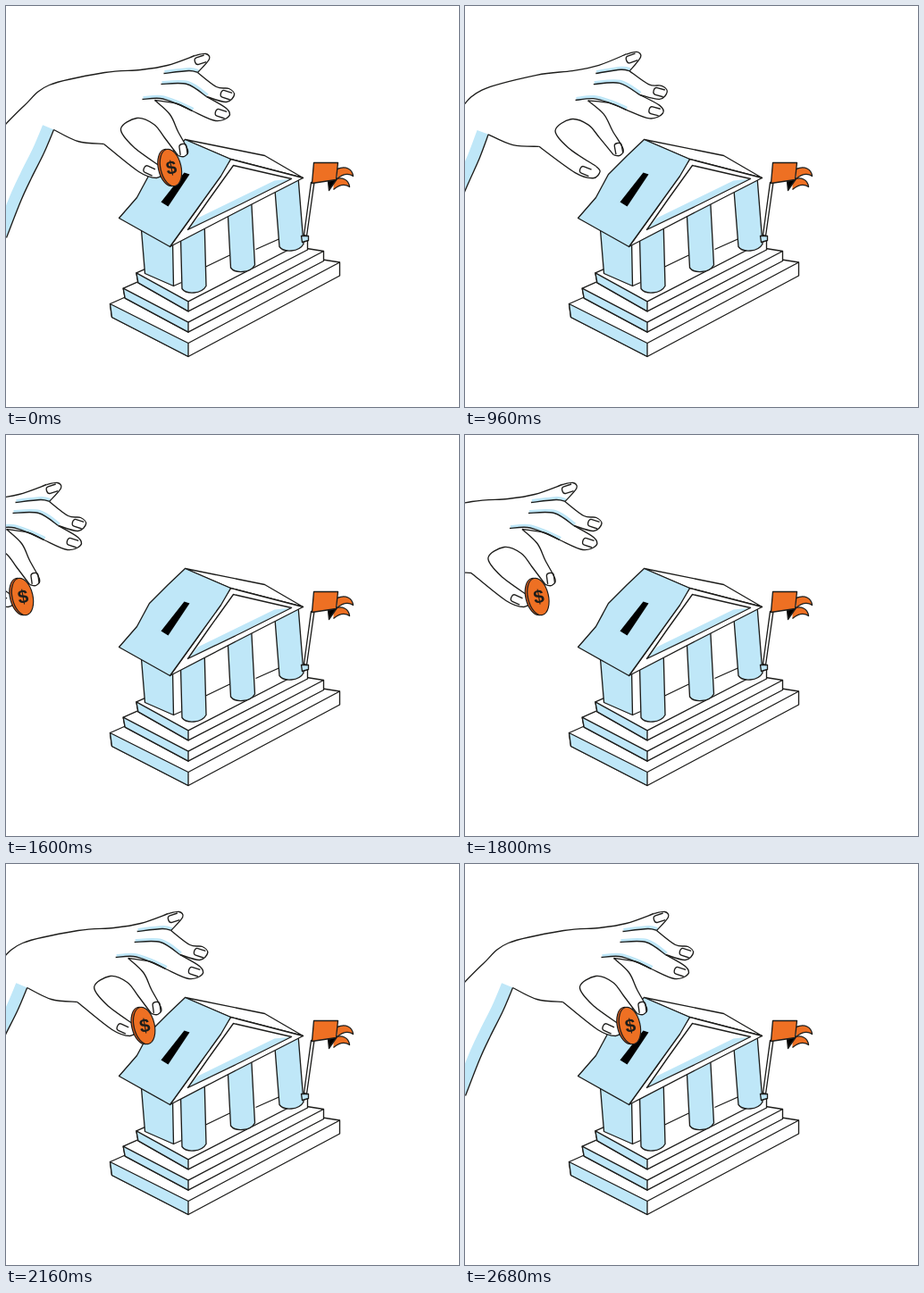
Recreate the animation shown at these times as an HTML page. Size 507 by 449 pixels, loop 2920 ms.

```html
<!DOCTYPE html>
<html lang="en">
<head>
<meta charset="utf-8">
<title>Saving at the bank</title>
<style>
  html, body { margin: 0; width: 100%; height: 100%; overflow: hidden; background: #fff; }
  svg { display: block; width: 507px; height: 449px; }
  path { stroke-linejoin: round; }
  text { font: bold 21px "Liberation Sans", Arial, sans-serif; text-anchor: middle; fill: #1d1d1b; }
</style>
</head>
<body>
<svg viewBox="0 0 507 449">
  <defs>
    <clipPath id="aboveSlot"><path d="M-300 0H335.500L127 300H-300Z"/></clipPath>
  </defs>
  <g transform="translate(.5 .5)">
    <g id="bank"></g>
    <g id="hand"></g>
    <g clip-path="url(#aboveSlot)"><g id="coin"></g></g>
  </g>
</svg>
<script>
const INK = '#1d1d1b', BLUE = '#bfe7f8', ORANGE = '#ee7023', RUST = '#d65a1c', WHITE = '#fff';
const LOOP = 2920, STEP = 40;
const [bank, hand, coin] = ['bank', 'hand', 'coin'].map(id => document.getElementById(id));

function add(parent, tag, attributes) {
  const node = document.createElementNS('http://www.w3.org/2000/svg', tag);
  for (const name in attributes) node.setAttribute(name, attributes[name]);
  parent.append(node);
  return node;
}

function draw(parent, d, fill = 'none', stroke = INK, transform = '', width = 1.35) {
  add(parent, 'path', { d, fill, stroke, transform, 'stroke-width': width });
}

// Smooth path through a list of "x,y" points
function curve(text) {
  const p = text.split(' ').map(s => s.split(',').map(Number));
  let d = `M${p[0]}`;
  for (let i = 0; i < p.length - 1; i++) {
    const a = p[i - 1] || p[i], b = p[i], c = p[i + 1], e = p[i + 2] || c;
    const out = b.map((v, k) => v + (c[k] - a[k]) / 6);
    const into = c.map((v, k) => v - (e[k] - b[k]) / 6);
    d += `C${out} ${into} ${c}`;
  }
  return d;
}

// Each step is a slab seen from its front corner
function drawStep(i) {
  const height = i ? 11 : 15;
  const [lx, ly] = [116 + 14.7 * i, 333 - 17.3 * i];
  const [fx, fy] = [203.5, 377 - 23.3 * i];
  const [rx, ry] = [373 - 18 * i, 286.5 - 12.5 * i];
  const side = `M${fx} ${fy + height}L${lx + 2} ${ly + height}L${lx} ${ly}`;
  draw(bank, `${side}L${lx + 18} ${ly - 8}L${rx - 19} ${ry - 3}L${rx} ${ry}V${ry + height}Z`, WHITE);
  draw(bank, `${side}L${fx} ${fy}Z`, BLUE);
  draw(bank, `M${fx} ${fy}L${rx} ${ry}`);
}

function drawColumn(i) {
  const x = 196.5 + 54.5 * i, y = 316 - 23.5 * i, lean = 2 + 2 * i;
  draw(bank, `M${x - lean} ${y - 76}L${x} ${y}c5 7 22 6 27 -3L${x + 27 - lean} ${y - 78}Z`, BLUE);
}

function drawBank() {
  for (let i = 0; i < 3; i++) drawStep(i);
  draw(bank, 'M151 250L190 262L324 198L330 262L223 315L187 313Z', WHITE, 'none');
  draw(bank, 'M222 292L251 278M279 272L306 260');
  draw(bank, 'M151 250L155 299L187 313L186 262Z', BLUE);
  draw(bank, 'M187 313L196 309');
  for (let i = 0; i < 3; i++) drawColumn(i);

  draw(bank, 'M200 149L289 167L332 192L251 171Z', WHITE);
  draw(bank, 'M251 171L332 192L258 230L183 269L214 226Z', WHITE);
  draw(bank, 'M203 250L214 237L300 195L318 193Z', BLUE, 'none');
  draw(bank, 'M254 178L319 193L263 221L203 250L226 217Z');
  draw(bank, 'M200 149L251 171L240 190L214 226L183 269L126 237L146 214L160 188L181 167Z', BLUE);
  draw(bank, 'M199 186L205 188L181 224L173 219Z', '#000', 'none');
}

function drawFlag() {
  draw(bank, 'M330 257H338V262L331 264Z', BLUE);
  draw(bank, 'M333 256L341 197H344.500L336 257Z', WHITE);
  const tail = 'M370 182C380 178 387 182 388 190C382 186 376 188 370 193';
  draw(bank, tail, ORANGE);
  draw(bank, tail, ORANGE, INK, 'translate(-4 12)');
  draw(bank, 'M360 196L370 193L361 206Z', '#000');
  draw(bank, 'M344 175L371 175L369 194L342 198Z', ORANGE);
}

// Soft shadow: a broad stroke beside a line
const shade = (d, dx, dy, width) => draw(hand, d, 'none', BLUE, `translate(${dx} ${dy})`, width);

const nail = (x, y, angle) =>
  draw(hand, 'M12 -4H3Q0 -4 0 0Q0 4 3 4H12', 'none', INK, `translate(${x} ${y}) rotate(${angle})`);

function drawHand() {
  const arm = curve('53,138 42,164 28,192 16,218 0,259');
  const outline = [
    curve('-3,134 20,111 48,88 110,74 150,71 180,66 211,55'),
    curve('211,55 223,53 227,59 214,74'),
    curve('214,74 235,90 249,92 255,99 246,107 224,101'),
    curve('224,101 246,114 249,123 234,128 208,117 191,109 166,105'),
    curve('166,105 183,121 192,140 203,161 199,168 192,167'),
    curve('192,167 177,147 165,132 146,125 128,137 142,157 172,179'),
    curve('172,179 176,185 168,192 148,185 109,154'),
    curve('109,154 80,151 53,138'),
    arm
  ];
  const creases = [
    curve('176,75 204,72 214,74'),
    curve('173,87 202,87 224,101'),
    curve('152,104 172,103 191,109 208,117')
  ];
  draw(hand, outline.map((d, i) => i ? 'L' + d.slice(1) : d).join('') + 'Z', WHITE, 'none');
  shade(arm, -6.4, -2.8, 13);
  for (const d of creases) shade(d, 1, -1.5, 4);
  for (const d of [...outline, ...creases]) draw(hand, d);

  nail(211, 62, -18);
  nail(240, 97, 18);
  nail(234, 118, 18);
  nail(197, 154, 82);
  nail(154, 181, 25);
}

function drawCoin() {
  const disc = (x, fill) => add(coin, 'ellipse', {
    cx: x, cy: 180.5, rx: 11.5, ry: 21, fill, stroke: INK, 'stroke-width': 1.2,
    transform: `rotate(-13 ${x} 180.5)`
  });
  disc(181.5, RUST);
  disc(184, ORANGE);
  add(coin, 'text', { x: 184.5, y: 187.5, transform: 'rotate(-10 184.5 180)' }).textContent = '$';
}

const progress = (t, start, end) => Math.min(1, Math.max(0, (t - start) / (end - start)));

function render(t) {
  const leaving = t < 1360;
  const shift = leaving
    ? -262 * progress(t, 760, 1360) ** 2
    : -266 * (1 - progress(t, 1360, 2680)) ** 2.35;
  const tilt = leaving ? -2.5 * progress(t, 760, 960) : 0;
  const drop = leaving ? 62 * progress(t, 200, 760) ** 2.2 : 0;
  hand.setAttribute('transform', `translate(${shift}) rotate(${tilt} 175 100)`);
  coin.setAttribute('transform', `translate(${shift + drop * 0.115} ${drop})`);
  coin.style.display = leaving && t >= 760 ? 'none' : '';
}

drawBank();
drawFlag();
drawHand();
drawCoin();

const start = performance.now();
function tick() {
  const t = (performance.now() - start) % LOOP;
  render(Math.floor(t / STEP) * STEP);
  requestAnimationFrame(tick);
}
tick();
</script>
</body>
</html>
```
